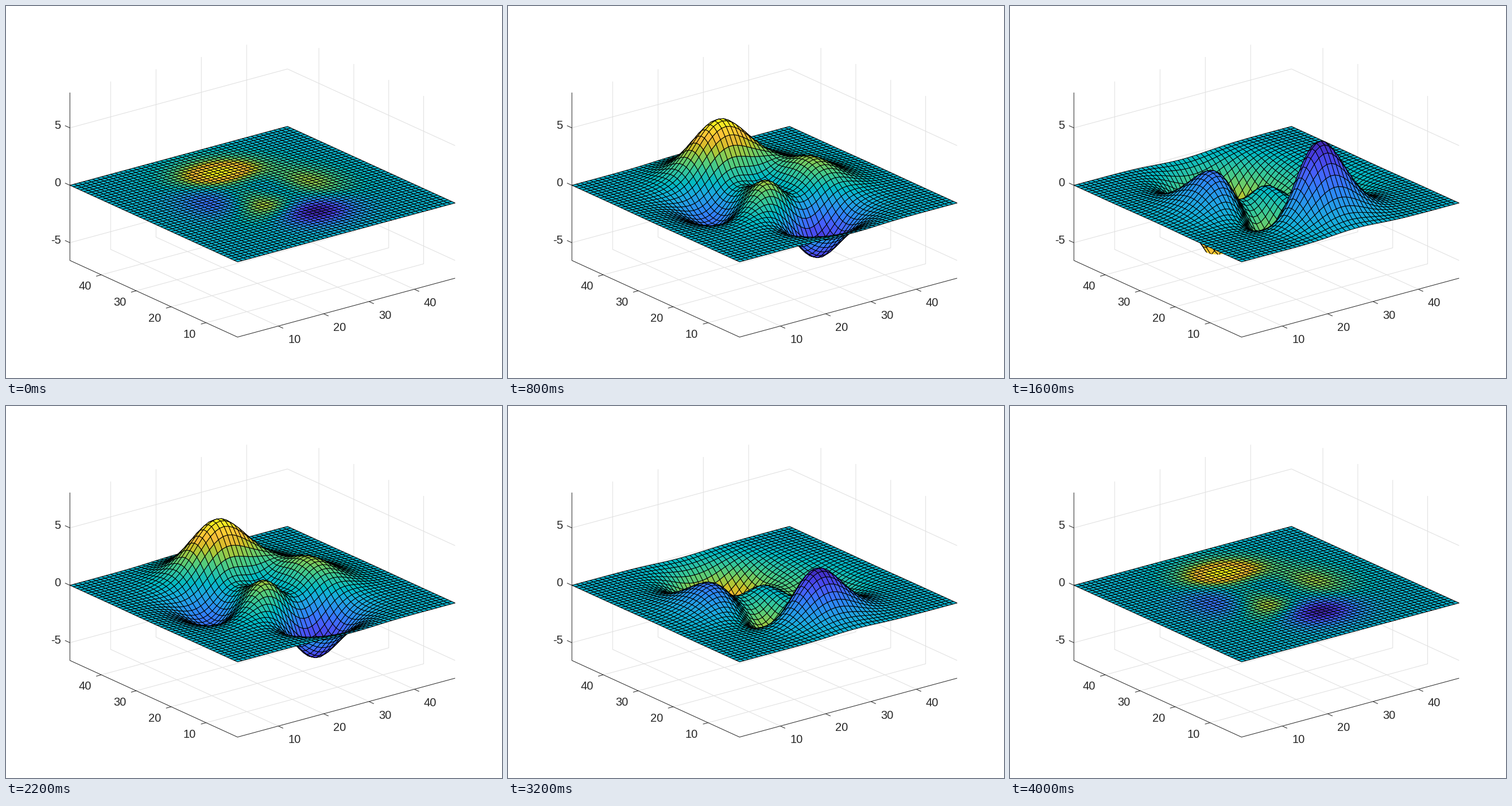
Animation, 864 px wide and 648 px high, one loop 4100 ms. Source, as a matplotlib script:

```python
import numpy as np
import matplotlib.pyplot as plt
from matplotlib.animation import FuncAnimation
from matplotlib.collections import LineCollection, PolyCollection
from matplotlib.colors import LinearSegmentedColormap

W, H, DPI = 864, 648, 100
PX = 72 / DPI                      # one pixel in points
N = 49                             # grid points per side
FRAMES, STEP = 41, np.pi / 10

# Screen projection: front corner at height 0, then pixels per grid unit
ORIGIN = np.array([403.3, 445.8])
EX = np.array([379.0, -102.6]) / (N - 1)
EY = np.array([-292.0, -133.5]) / (N - 1)
EZ = np.array([0.0, -20.0])

INK, GRID = "#262626", "#dfdfdf"
COLORS = ("3E26A8 4332CB 4741E5 4852F4 4563FD 3875FE 2E87F7 2796EB 20A5E3 "
          "12B1D6 02BAC3 24C1AE 37C897 57CC7A 81CC59 ABC739 D1BF27 F0BA36 "
          "FEC338 FAD62D F5E924 F9FB15")
cmap = LinearSegmentedColormap.from_list(
    "surface", ["#" + c for c in COLORS.split()])


def project(x, y, z):
    x, y, z = (np.asarray(v, float)[..., None] for v in (x, y, z))
    return ORIGIN + (x - 1) * EX + (y - 1) * EY + z * EZ


def peaks(x, y):
    return (3 * (1 - x) ** 2 * np.exp(-x ** 2 - (y + 1) ** 2)
            - 10 * (x / 5 - x ** 3 - y ** 5) * np.exp(-x ** 2 - y ** 2)
            - np.exp(-(x + 1) ** 2 - y ** 2) / 3)


X, Y = np.meshgrid(np.arange(1, N + 1), np.arange(1, N + 1))
Z = peaks((X - 25) / 8, (Y - 25) / 8)
LOW, HIGH = Z.min(), Z.max()


def cells(a):
    """Closed corner loops of all cells, far ones first."""
    loop = [a[:-1, :-1], a[:-1, 1:], a[1:, 1:], a[1:, :-1], a[:-1, :-1]]
    quads = np.stack(loop, axis=2)[::-1, ::-1]
    return quads.reshape(-1, *quads.shape[2:])


def clip(pts, z):
    """Cut a cell at the floor; the path stays open along the cut."""
    pts, z = pts[:4], z[:4]
    up = z >= LOW
    if not up.any():
        return np.full((3, 2), -50.0)

    def cut(a, b):
        t = (LOW - z[a]) / (z[b] - z[a])
        return pts[a] + t * (pts[b] - pts[a])

    k = next(i for i in range(4) if up[i] and not up[i - 1])
    out = [cut((k - 1) % 4, k)]
    while up[k]:
        out.append(pts[k])
        k = (k + 1) % 4
    out.append(cut((k - 1) % 4, k))
    return np.array(out)


def surface(scale):
    z = scale * Z
    loops, heights = cells(project(X, Y, z)), cells(z)
    if z.min() >= LOW - 1e-9:
        return loops
    return [p if h.min() >= LOW else clip(p, h)
            for p, h in zip(loops, heights)]


fig = plt.figure(figsize=(W / DPI, H / DPI), dpi=DPI, facecolor="white")
ax = fig.add_axes([0, 0, 1, 1])
ax.set_xlim(0, W)
ax.set_ylim(H, 0)
ax.axis("off")


def lines(segments, color, order):
    ax.add_collection(LineCollection(segments, colors=color, linewidths=PX,
                                     zorder=order), autolim=False)


def label(text, x, y, ha="center"):
    ax.text(x, y + 7.2, text, ha=ha, va="baseline", color=INK,
            family="Liberation Sans", fontsize=20 * PX)


def tick(pos, direction):
    return [pos, pos + 9.3 * direction / np.hypot(*direction)]


grid, ticks = [], []
for v in (10, 20, 30, 40):
    grid.append(project([v, v, v], [1, N, N], [LOW, LOW, HIGH]))
    grid.append(project([1, N, N], [v, v, v], [LOW, LOW, HIGH]))
    px, py = project(v, 1, LOW), project(1, v, LOW)
    ticks += [tick(px, -EY), tick(py, -EX)]
    label(str(v), px[0] + 27.8, px[1] + 22.6)
    label(str(v), py[0] - 28.8, py[1] + 19)
for v in (-5, 0, 5):
    grid.append(project([1, N, N], [N, N, 1], [v, v, v]))
    pz = project(1, N, v)
    ticks.append(tick(pz, EY))
    label(str(v).replace("-", "\u2010"), 95.6, pz[1] - 5.8, "right")

frame = project([1, 1, 1, N], [N, N, 1, 1], [HIGH, LOW, LOW, LOW])
lines(grid, GRID, 1)
lines([frame] + ticks, INK, 2)

mesh = PolyCollection(surface(0), closed=False, edgecolors="black",
                      facecolors=cmap((cells(Z)[:, 0] - LOW) / (HIGH - LOW)),
                      linewidths=PX, joinstyle="round", zorder=3)
ax.add_collection(mesh, autolim=False)


def draw(i):
    mesh.set_verts(surface(np.sin(i * STEP)), closed=False)
    return [mesh]


anim = FuncAnimation(fig, draw, frames=FRAMES, interval=100, repeat=True,
                     repeat_delay=0, blit=False)
plt.show()
```
